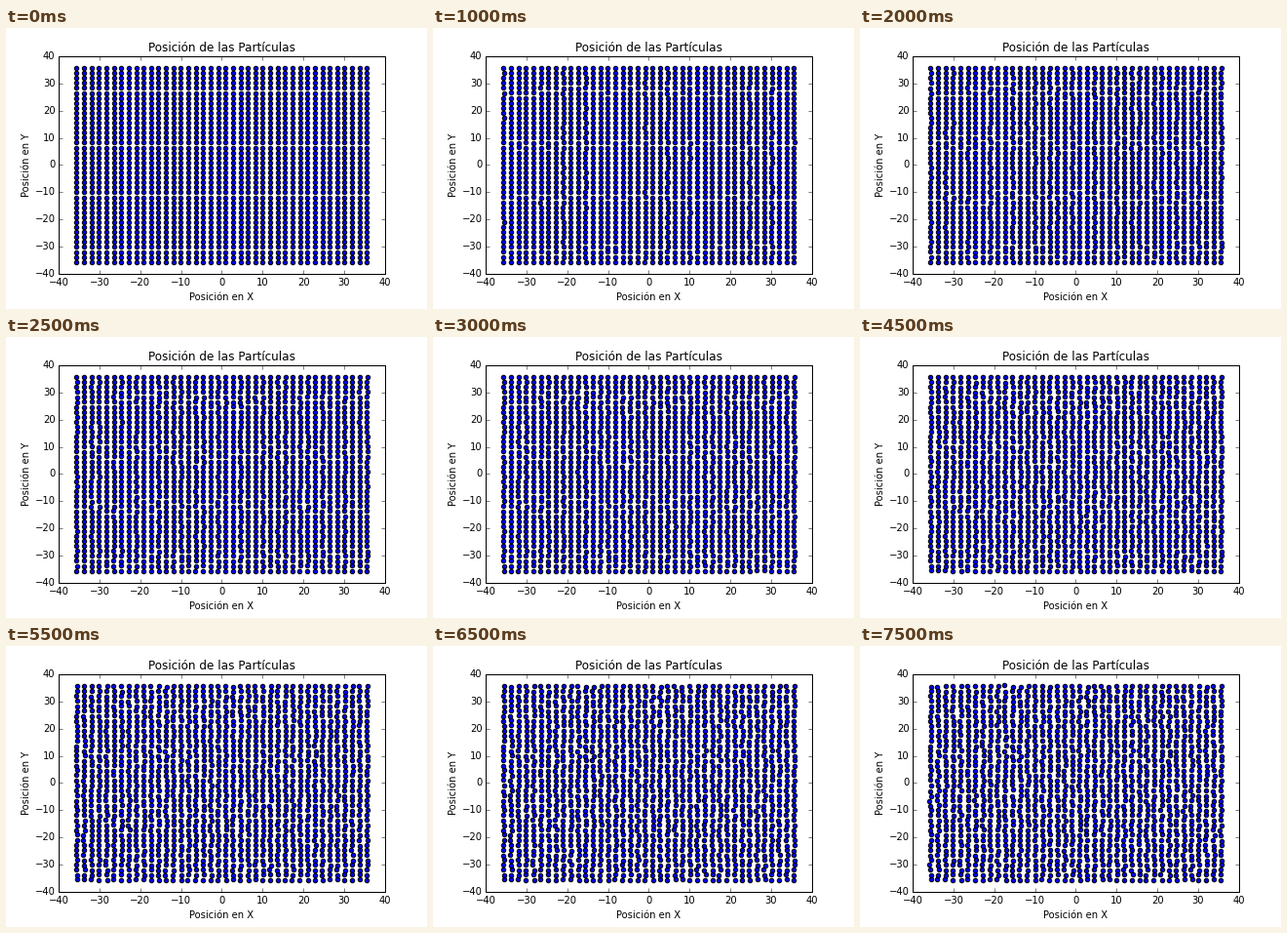
A matplotlib script that plays this animation: 432 px wide and 288 px high, repeating every 8000 ms.

```python
import matplotlib.pyplot as plt
import numpy as np
from matplotlib.animation import FuncAnimation

FRAMES, INTERVAL = 16, 500
SIDE = 40                       # particles per row and column
DENSITY = 0.3
SPACING = DENSITY ** -0.5       # lattice constant
V_MAX = 0.03                    # data units per second

plt.style.use("classic")
plt.rcParams.update({
    "font.family": "DejaVu Sans",
    "font.size": 10,
    "axes.titlesize": 12,
    "axes.labelsize": 10,
    "xtick.labelsize": 10,
    "ytick.labelsize": 10,
    "ytick.major.pad": 3.5,
    "figure.facecolor": "white",
    "savefig.facecolor": "white",
    "savefig.dpi": 72,
})

fig, ax = plt.subplots(figsize=(6, 4), dpi=72)
fig.subplots_adjust(left=0.125, right=0.9, bottom=0.125, top=0.9)
ax.set(xlim=(-40, 40), ylim=(-40, 40), title="Posición de las Partículas")
ax.set_xlabel("Posición en X")
ax.set_ylabel("Posición en Y", labelpad=3)

# Square lattice centred on the origin, with a random velocity per particle
line = (np.arange(SIDE) - (SIDE - 1) / 2) * SPACING
gx, gy = np.meshgrid(line, line, indexing="ij")
start = np.column_stack([gx.ravel(), gy.ravel()])
velocity = np.random.default_rng(7).uniform(-V_MAX, V_MAX, start.shape)

dots = ax.scatter(start[:, 0], start[:, 1], s=20, c="blue",
                  edgecolors="black", linewidths=1)


def update(i):
    """Free drift of every particle away from the lattice."""
    dots.set_offsets(start + velocity * i * INTERVAL / 1000)
    return (dots,)


anim = FuncAnimation(fig, update, frames=FRAMES, interval=INTERVAL,
                     repeat=True, repeat_delay=0)
plt.show()
```
